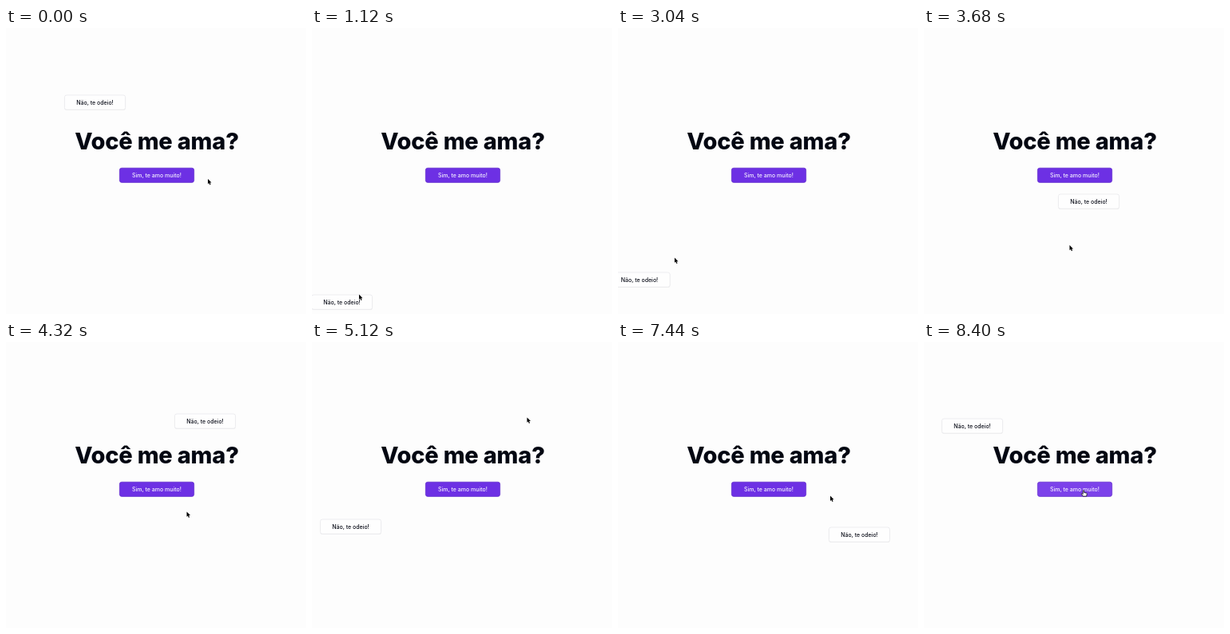
Animation, 376 px wide and 358 px high, one loop 8560 ms. Source, as an HTML page:

```html
<!DOCTYPE html>
<html lang="pt-BR">
<head>
<meta charset="utf-8">
<title>Você me ama?</title>
<style>
  html, body { margin: 0; width: 100%; height: 100%; overflow: hidden; background: #fdfdfd; }
  svg { display: block; width: 376px; height: 358px; }
  text { font-family: Inter, "Open Sans", sans-serif; text-anchor: middle; }
  .title { font-size: 29px; font-weight: 800; letter-spacing: -0.2px; fill: #030712; }
  .label { font-size: 7px; font-weight: 500; }
</style>
</head>
<body>
<svg viewBox="0 0 376 358">
  <rect width="376" height="358" fill="#fdfdfd"/>
  <text class="title" x="189" y="152">Você me ama?</text>

  <rect id="yes" x="142.3" y="175.2" width="93.4" height="18.2" rx="2.8" stroke="#5a24c4" stroke-width=".6"/>
  <text class="label" x="189" y="186.6" fill="#f6f3ff">Sim, te amo muito!</text>

  <g id="no">
    <rect x="0.3" y="0.6" width="76.6" height="18.4" rx="2.8" fill="#000" opacity=".05"/>
    <rect x="0.4" y="0" width="76.2" height="18.2" rx="2.6" fill="#fefefe" stroke="#e5e6ea" stroke-width=".7"/>
    <text class="label" x="38.5" y="11.6" fill="#0a0d18">Não, te odeio!</text>
  </g>

  <g id="pointer">
    <path id="arrow" transform="translate(.5 .4) scale(.87)"
      d="M0 0V7.4L1.7 5.9L2.8 8.6L4.1 8L3 5.4H5.2Z"
      fill="#000" stroke="#fff" stroke-width=".6" paint-order="stroke"/>
    <path id="hand" d="M-.8 .6Q0 -.5 .7 .6V3L3.5 3.5Q4.3 3.7 4.2 4.6L3.7 7.6H-.6L-2.7 4.8Q-2.5 3.8 -1.5 4.3L-.8 5Z"
      fill="#fff" stroke="#111" stroke-width=".8"/>
  </g>
</svg>
<script>
const LOOP = 8560, STEP = 80;
const $ = id => document.getElementById(id);

const home = { x: 73, y: 84 };
const pointerStart = { x: 252.5, y: 188.5 };
const goal = { at: 8400, x: 200, y: 185.5 };

// when the button is touched, and where it flees to
const escapes = [
  [240, -1, 334], [1200, 178, 124], [2480, -11.5, 306], [3200, 168, 208],
  [4320, 211, 90], [5120, 10, 222], [5520, -8, 254], [5920, 350.5, 333],
  [6720, 201, 183], [7360, 264, 232], [7760, 22, 96]
].map(([at, x, y]) => ({ at, x, y }));

// the pointer touches each button near its upper right, within the stage
const touch = button => ({ x: Math.min(button.x + 58, 354), y: button.y + 4 });

const places = [home, ...escapes];
const stops = [
  { at: 0, ...pointerStart },
  ...escapes.map((e, i) => ({ at: e.at, ...touch(places[i]) })),
  goal
];

const smooth = u => u * u * (3 - 2 * u);

function pointerAt(t) {
  const next = Math.max(1, stops.findIndex(s => s.at > t));
  if (t >= goal.at) return goal;
  const from = stops[next - 1], to = stops[next];
  const u = smooth((t - from.at) / (to.at - from.at));
  // upward moves swing out to the right
  const swing = Math.min(80, Math.max(0, from.y - to.y) * 0.7);
  return {
    x: from.x + (to.x - from.x) * u + swing * Math.sin(Math.PI * u),
    y: from.y + (to.y - from.y) * u
  };
}

const buttonAt = t => escapes.filter(e => e.at <= t).pop() || home;
const inside = (p, x, y, w, h) => p.x > x && p.x < x + w && p.y > y && p.y < y + h;
const place = (el, p) => el.setAttribute("transform", `translate(${p.x} ${p.y})`);
const show = (el, on) => { el.style.display = on ? "" : "none"; };

function draw(time) {
  const t = Math.floor((time % LOOP) / STEP) * STEP;
  const pointer = pointerAt(t);
  const caught = t > escapes.at(-1).at && inside(pointer, 142, 175, 94, 19);
  place($("no"), buttonAt(t));
  place($("pointer"), pointer);
  $("yes").setAttribute("fill", caught ? "#7c42ea" : "#6d30e4");
  show($("arrow"), !caught);
  show($("hand"), caught);
}

const start = performance.now();
function tick(now) {
  draw(Math.max(0, now - start));
  requestAnimationFrame(tick);
}
draw(0);
requestAnimationFrame(tick);
</script>
</body>
</html>
```
